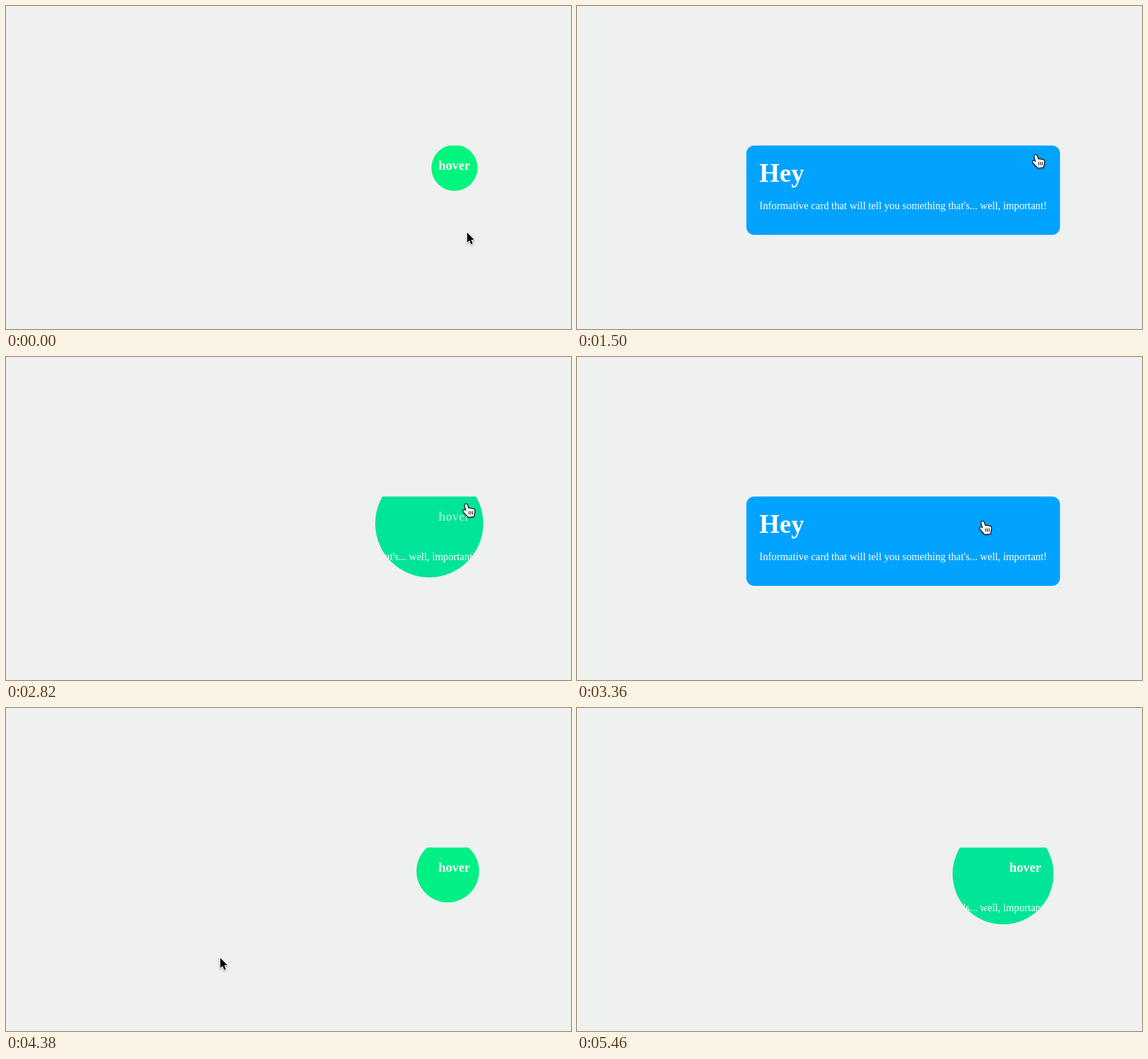
Write an HTML page with a canvas that moves like this. It is 990 px wide and 566 px high and loops after 5.52 s.

```html
<!DOCTYPE html>
<html lang="en">
<head>
<meta charset="utf-8">
<title>Hover card</title>
<style>
  html, body { margin: 0; width: 100%; height: 100%; overflow: hidden; background: #eff0f0; }
  canvas { display: block; }
</style>
</head>
<body>
<canvas id="stage" width="990" height="566"></canvas>
<script>
const ctx = document.getElementById('stage').getContext('2d');
const LOOP = 5520, STEP = 60, MORPH = 400, FADE = 210;
const SERIF = '"Liberation Serif", Times, serif';
const CARD = { x: 296.7, y: 244.5, w: 549.6, h: 156.5, r: 14 };
const GREEN = [0, 245, 126], BLUE = [2, 162, 255];

// pointer enters and leaves, alternating
const toggles = [426, 1714, 2756, 4096, 4903, 5254];

// places the pointer passes: time, x, y
const stops = [
  [0, 808, 397], [500, 806, 300], [1500, 804, 261], [1800, 808, 207],
  [2100, 809, 193], [2430, 809, 194], [2900, 800, 268], [3360, 711, 288],
  [3840, 620, 312], [4140, 173, 347], [4440, 450, 450], [4740, 845, 400],
  [4980, 795, 282], [5340, 138, 540], [LOOP, 60, 700]
];

const arrow = new Path2D('M0 0V17.5L4 13.8L6.8 20.6L9.8 19.3L7 12.7L12.4 12.4Z');
const hand = new Path2D('M-2.4 3Q-2.8 .3 -.6 0Q1.4 -.2 2.2 2.2L4 8Q5.6 6.6 7.4 8' +
  'Q9.6 7 11 8.8Q14.2 8.2 14.8 10.8L14.2 15.5Q13.4 18.5 13.2 21.5L3.6 22.4' +
  'Q1.6 20 -.6 17.8L-4.8 13.2Q-6 10 -3 10.2L.2 12.4Z');

const mix = (a, b, p) => a + (b - a) * p;

// cubic-bezier(.25, .1, .25, 1)
function ease(x) {
  if (x <= 0) return 0;
  if (x >= 1) return 1;
  let lo = 0, hi = 1, s;
  for (let i = 0; i < 24; i++) {
    s = (lo + hi) / 2;
    if (0.75 * s * (1 - s) + s ** 3 < x) lo = s; else hi = s;
  }
  return 0.3 * s * (1 - s) ** 2 + 3 * s * s * (1 - s) + s ** 3;
}

function hoverState(t) {
  const count = toggles.filter(at => at <= t).length;
  const over = count % 2 === 1;
  const since = count ? t - toggles[count - 1] : LOOP;
  const level = span => over ? ease(since / span) : 1 - ease(since / span);
  return { over, open: level(MORPH), label: 1 - level(FADE) };
}

// smooth curve through the stops
function pointerAt(t) {
  const last = stops.length - 1;
  const i = stops.findIndex(s => s[0] > t) - 1;
  const a = stops[i], b = stops[i + 1], span = b[0] - a[0];
  const u = (t - a[0]) / span;
  const slope = (j, k) => {
    const p = stops[Math.max(j - 1, 0)], n = stops[Math.min(j + 1, last)];
    return (n[k] - p[k]) / (n[0] - p[0]) * span;
  };
  return [1, 2].map(k =>
    mix(a[k], b[k], u * u * (3 - 2 * u)) +
    u * (1 - u) * ((1 - u) * slope(i, k) - u * slope(i + 1, k)));
}

function write(text, x, y, size, weight = '') {
  ctx.font = `${weight} ${size}px ${SERIF}`;
  ctx.fillText(text, x, y);
}

function drawCard({ open, label }) {
  const { x, y, w, h, r } = CARD;
  const reach = Math.hypot(w, h) / Math.SQRT2;
  ctx.save();
  ctx.beginPath();
  ctx.arc(x + w * mix(0.89, 0.5, open), y + h * mix(0.25, 0.5, open),
    reach * mix(0.1, 0.75, open), 0, Math.PI * 2);
  ctx.clip();
  ctx.beginPath();
  ctx.roundRect(x, y, w, h, r);
  ctx.fillStyle = `rgb(${GREEN.map((c, i) => Math.round(mix(c, BLUE[i], open)))})`;
  ctx.fill();
  ctx.fillStyle = '#fff';
  write('Hey', 319.6, 308.2, 45.5, 'bold');
  write("Informative card that will tell you something that's... well, important!", 319.6, 355.5, 18.19);
  ctx.globalAlpha = label;
  write('hover', 757.8, 287, 22.74, 'bold');
  ctx.restore();
}

function drawPointer(x, y, over) {
  const shape = over ? hand : arrow;
  ctx.save();
  ctx.translate(x, y);
  ctx.lineJoin = 'round';
  ctx.shadowColor = 'rgba(0,0,0,.35)';
  ctx.shadowBlur = 3;
  ctx.shadowOffsetY = 1.5;
  ctx.strokeStyle = over ? '#000' : '#fff';
  ctx.lineWidth = 2.5;
  ctx.stroke(shape);
  ctx.shadowColor = 'transparent';
  ctx.fillStyle = over ? '#fff' : '#000';
  ctx.fill(shape);
  if (over) {
    ctx.fillStyle = '#000';
    for (let i = 0; i < 3; i++) ctx.fillRect(4.4 + 3.1 * i, 12.2, 1.2, 5.8);
  }
  ctx.restore();
}

const start = performance.now();

function draw() {
  const now = (performance.now() - start) % LOOP;
  const t = Math.floor(now / STEP) * STEP;
  const state = hoverState(t);
  ctx.fillStyle = '#eff0f0';
  ctx.fillRect(0, 0, 990, 566);
  drawCard(state);
  drawPointer(...pointerAt(t), state.over);
  requestAnimationFrame(draw);
}
draw();
</script>
</body>
</html>
```
